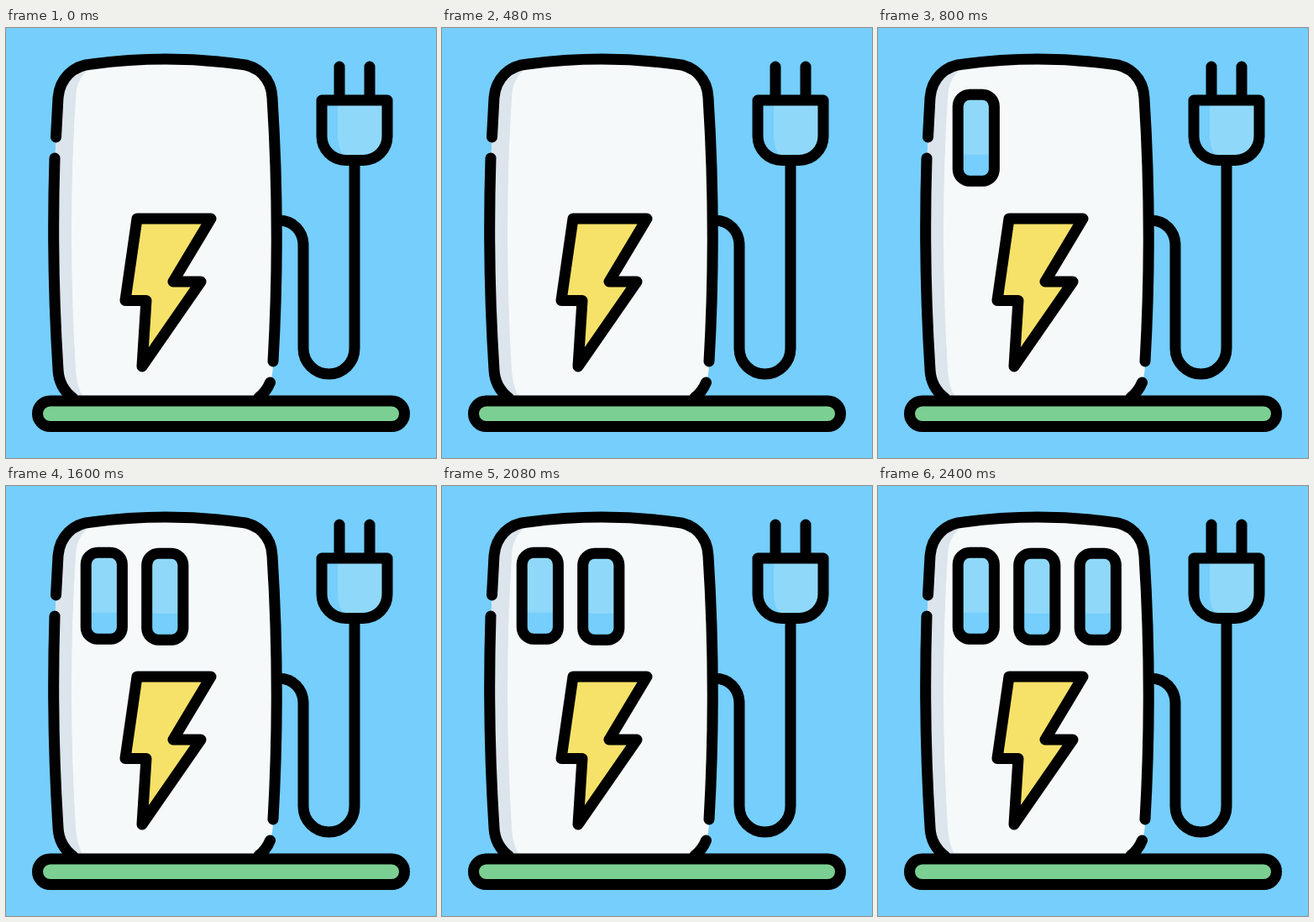
Recreate the animation shown at these times as an HTML page. Size 512x512 px, loop 3200 ms.

```html
<!DOCTYPE html>
<html lang="en">
<head>
<meta charset="utf-8">
<title>Charging station</title>
<style>
  html, body { margin: 0; width: 100%; height: 100%; overflow: hidden; background: #75cefc; }
  svg { display: block; width: 100%; height: 100%; }
  .line { fill: none; stroke: #000; stroke-width: 13; stroke-linecap: round; stroke-linejoin: round; }
  .cell { visibility: hidden; animation: 3200ms step-end infinite; }
  .first { animation-name: first; }
  .second { animation-name: second; }
  .third { animation-name: third; }
  @keyframes first { 0% { visibility: hidden } 25%, 100% { visibility: visible } }
  @keyframes second { 0% { visibility: hidden } 50%, 100% { visibility: visible } }
  @keyframes third { 0% { visibility: hidden } 75%, 100% { visibility: visible } }
</style>
</head>
<body>
<svg viewBox="0 0 512 512">
  <defs>
    <path id="body" d="M80 441Q63 428 62 407Q52 240 62 83C64 60 80 44.500 102 43Q190 31 278 43C300 44.500 316 60 317 83Q327 240 318 399Q318 428 300 441Z"/>
    <clipPath id="bodyClip"><use href="#body"/></clipPath>
    <path id="plug" d="M376 86H454V129A28.500 28.500 0 0 1 425.500 157.500H404.500A28.500 28.500 0 0 1 376 129Z"/>
    <clipPath id="plugClip"><use href="#plug"/></clipPath>
    <g id="cell">
      <rect x="95.200" y="79.300" width="43.200" height="103" rx="14" fill="#8fd8f9"/>
      <path d="M96 150Q117 152 138 150V170Q138 182 126 182H108Q96 182 96 170Z" fill="#75cefc"/>
      <rect class="line" x="95.200" y="79.300" width="43.200" height="103" rx="14"/>
    </g>
  </defs>

  <rect width="512" height="512" fill="#75cefc"/>

  <!-- Cable and plug -->
  <path class="line" d="M325 229C342 229 354 242 354 259V381.500A30.500 30.500 0 0 0 415 381.500V158"/>
  <path class="line" d="M397 46V84M433 46V84"/>
  <use href="#plug" fill="#8fd8f9"/>
  <path clip-path="url(#plugClip)" d="M376 86H395V129Q395 147 408 158H376Z" fill="#75cefc"/>
  <use class="line" href="#plug"/>

  <!-- Housing -->
  <use href="#body" fill="#f5f9fa"/>
  <path clip-path="url(#bodyClip)" d="M40 30H122V41C96 44 84 60 83 83Q73 240 83 407Q84 428 93 441H40Z" fill="#dce4ec"/>
  <path class="line" d="M59.500 130L62 83C64 60 80 44.500 102 43Q190 31 278 43C300 44.500 316 60 317 83Q327 240 318 397"/>
  <path class="line" d="M58 155Q54 281 62 407Q63 428 80 441M314.500 422Q310 433 301 440"/>

  <path class="line" d="M156 227H244L199 302H232L162 403L167 324.500H142Z" style="fill:#f6e268"/>

  <use class="cell first" href="#cell"/>
  <use class="cell second" href="#cell" x="72.500" y="1"/>
  <use class="cell third" href="#cell" x="145" y="1"/>

  <!-- Ground -->
  <rect class="line" x="37.500" y="444" width="437" height="30.500" rx="15.250" style="fill:#7ccf92"/>
</svg>
</body>
</html>
```
